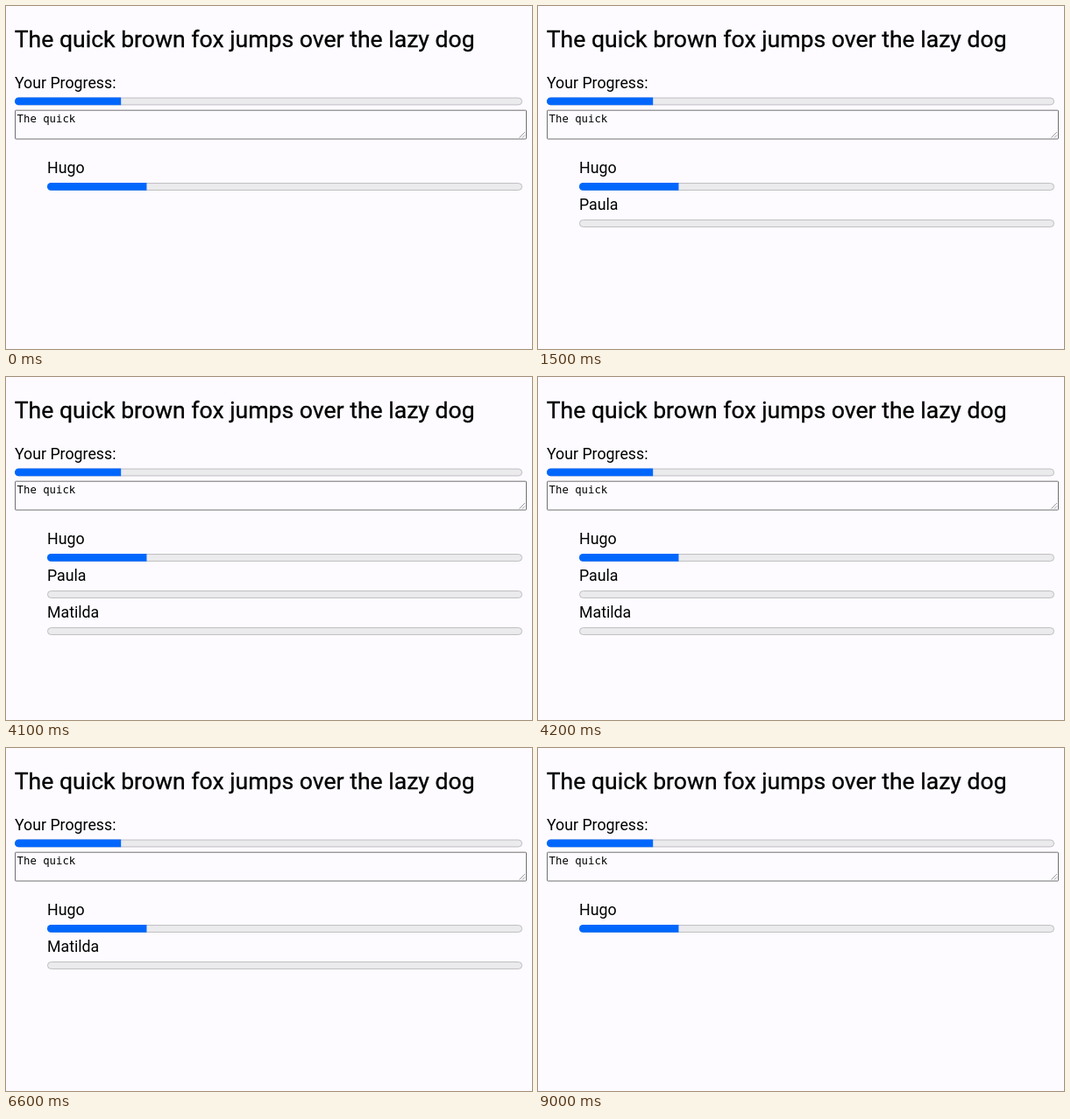
These frames come from a looping animation (600 by 392 pixels, 9100 ms). An HTML page:

```html
<!DOCTYPE html>
<html lang="en">
<head>
<meta charset="utf-8">
<title>Typing race</title>
<style>
  html, body { margin: 0; width: 100%; height: 100%; overflow: hidden; background: #fdfbff; }
  svg { display: block; width: 600px; height: 392px; }
  text { font: 17.75px Roboto, sans-serif; fill: #000; }
  .title { font-size: 26.6px; stroke: #000; stroke-width: .3px; }
  .typed { font: 12.3px "DejaVu Sans Mono", monospace; }
  .track { fill: #ebeaed; stroke: #b9b8bb; stroke-width: .9; }
  .done { fill: #0067fc; }
  .box { fill: none; stroke: #707072; }
  .grip { fill: none; stroke: #858587; stroke-width: .8; }
</style>
</head>
<body>
<svg viewBox="0 0 600 392">
  <text class="title" x="9.7" y="47">The quick brown fox jumps over the lazy dog</text>
  <text x="10" y="93.5">Your Progress:</text>
  <g id="own"></g>
  <rect class="box" x="10.5" y="119.2" width="583" height="32.8" rx=".8"/>
  <text class="typed" x="12.6" y="133">The quick</text>
  <path class="grip" d="M585.5 150.5l6.5-6.5M589 150.5l3-3"/>
  <g id="players"></g>
</svg>
<script>
const LOOP = 9100, RIGHT = 589, ROW = 42;
const sentence = 'The quick brown fox jumps over the lazy dog';
const progress = 'The quick'.length / sentence.length;

// Each player is listed from the join time until the leave time.
const players = [
  { name: 'Hugo', join: 0, leave: LOOP, done: progress },
  { name: 'Paula', join: 700, leave: 6600, done: 0 },
  { name: 'Matilda', join: 4000, leave: 8200, done: 0 },
];

function bar(x, y, done) {
  const width = RIGHT - x, end = x + width * done;
  const fill = done
    ? `<path class="done" d="M${end} ${y}H${x + 4.3}a4.3 4.3 0 0 0 0 8.6H${end}z"/>`
    : '';
  return `<rect class="track" x="${x + .45}" y="${y + .45}" width="${width - .9}" height="7.9" rx="3.95"/>${fill}`;
}

function row(player, index) {
  const y = index * ROW;
  return `<text x="47" y="${191 + y}">${player.name}</text>${bar(47, 202.1 + y, player.done)}`;
}

document.getElementById('own').innerHTML = bar(10, 104.6, progress);
const list = document.getElementById('players');
let shown = '';

function draw() {
  const time = performance.now() % LOOP;
  const present = players.filter(p => time >= p.join && time < p.leave);
  const html = present.map(row).join('');
  if (html !== shown) list.innerHTML = shown = html;
  requestAnimationFrame(draw);
}
draw();
</script>
</body>
</html>
```
